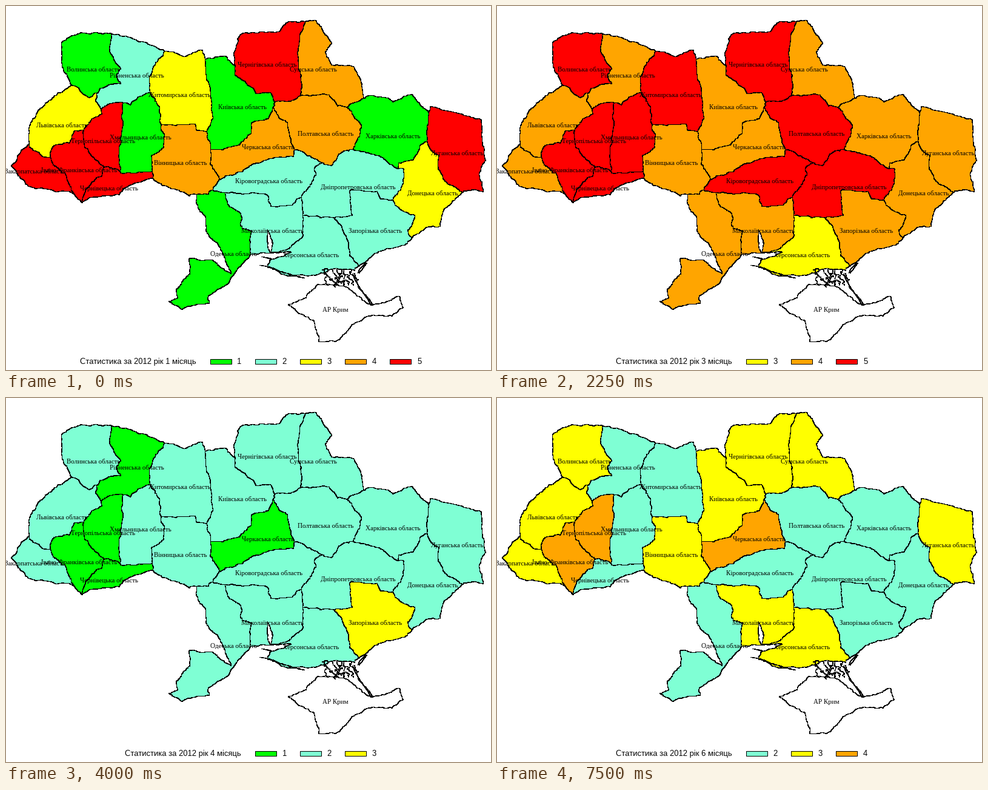
A matplotlib script for the animation above (8000 ms loop, 800 by 600 pixels).

```python
import numpy as np
import matplotlib
import matplotlib.pyplot as plt
from matplotlib.animation import FuncAnimation
from matplotlib.patches import Polygon, Rectangle

matplotlib.rcParams.update({"text.hinting": "native", "path.simplify": False})

DPI = 100
PX = 72 / DPI
INTERVAL = 250
FRAMES = 32
HOLD = 7          # frames per month
ELAPSED = 5       # frames of the first month already over
COLORS = {1: "#00ff00", 2: "#7fffd4", 3: "#ffff00", 4: "#ffa500", 5: "#ff0000"}

# Each month: the common level, then the regions that differ from it
MONTHS = [
    (5, {1: "vol kyi khm kha ode", 2: "riv kir dni myk khe zap",
         3: "zhy lvi don", 4: "sum vin chk pol"}),
    (2, {1: "chv", 3: "riv zhy chk dni khe", 4: "kyi kha zap", 5: "lvi kir ode"}),
    (4, {3: "khe", 5: "vol zhy chg ter khm ifr chv pol kir dni"}),
    (2, {1: "riv ter ifr chv chk", 3: "zap"}),
    (4, {3: "zhy chg ter zak luh dni don myk khe zap", 5: "chv"}),
    (2, {3: "vol kyi chg sum lvi zak vin luh myk khe", 4: "ter ifr chk"}),
]

# Points where borders meet
JUNCTIONS = dict(
    a=(108, 130), b=(150, 143), c=(175, 46), d=(261, 74), e=(237, 142), f=(193, 159),
    g=(156, 170), h=(128, 204), i=(72, 249), j=(37, 228), k=(113, 311), l=(125, 324),
    m=(162, 265), n=(189, 275), o=(241, 272), p=(242, 284), q=(255, 194), r=(328, 87),
    s=(331, 207), t=(337, 236), u=(353, 286), v=(341, 303), w=(314, 310), x=(378, 99),
    y=(443, 158), z=(440, 167), A=(475, 237), B=(521, 258), C=(487, 315), D=(361, 307),
    E=(494, 25), F=(486, 147), G=(590, 152), H=(563, 167), I=(572, 236), J=(646, 268),
    K=(694, 223), L=(697, 176), M=(752, 307), N=(638, 320), O=(670, 381), P=(541, 349),
    Q=(489, 345), R=(582, 428), S=(437, 407), T=(403, 409))

rng = np.random.default_rng(7)
fig = plt.figure(figsize=(800 / DPI, 600 / DPI), dpi=DPI, facecolor="white")
ax = fig.add_axes([0, 0, 1, 1])
ax.set_xlim(0, 800)
ax.set_ylim(600, 0)
ax.axis("off")

borders = []
patches = {}


def fractal(a, b, rough):
    """Points from a (left out) to b, by midpoint displacement."""
    length = np.hypot(*(b - a))
    if length < 3:
        return [b]
    middle = (a + b) / 2 + rng.normal(0, rough * np.sqrt(length), 2)
    return fractal(a, middle, rough) + fractal(middle, b, rough)


def jagged(points, rough=0.22):
    points = np.array(points, float)
    line = [points[0]]
    for a, b in zip(points, points[1:]):
        line += fractal(a, b, rough)
    return np.floor(line) + 0.5


def stroke(line):
    ax.plot(*line.T, color="black", linewidth=0.5 * PX, antialiased=False,
            snap=False, zorder=3)


def border(owners, ends, *bends):
    line = jagged([JUNCTIONS[ends[0]], *zip(bends[::2], bends[1::2]), JUNCTIONS[ends[1]]])
    borders.append((owners.split(), line))
    stroke(line)


def outline_of(key):
    """Chain every border of a region into one ring."""
    parts = [line for owners, line in borders if key in owners]
    ring = parts.pop(0)
    while parts:
        _, n, end = min((np.hypot(*(part[end] - ring[-1])), n, end)
                        for n, part in enumerate(parts) for end in (0, -1))
        part = parts.pop(n)
        ring = np.vstack([ring, part if end == 0 else part[::-1]])
    return ring


def label(x, y, text):
    ax.text(x, y + 3.5, text, family="Liberation Serif", fontsize=11 * PX,
            ha="center", va="baseline", zorder=5)


def region(key, name, x, y):
    patches[key] = ax.add_patch(Polygon(outline_of(key), linewidth=0, antialiased=False))
    label(x, y, name + " область")


# West
border("vol", "ac", 92, 95, 92, 59, 126, 44)
border("vol riv", "cb", 172, 78, 189, 104, 182, 115, 189, 128, 172, 129)
border("vol lvi", "ba", 137, 151, 119, 134)
border("riv", "cd", 208, 53, 246, 67)
border("riv zhy", "de", 249, 92, 236, 118)
border("riv khm", "ef", 224, 148, 205, 163)
border("riv ter", "fg", 175, 160)
border("riv lvi", "gb", 148, 153)
border("lvi", "aj", 92, 142, 55, 170, 38, 200)
border("lvi zak", "ji", 47, 238, 60, 248)
border("lvi ifr", "ih", 76, 232, 104, 226, 112, 206)
border("lvi ter", "hg", 140, 188, 158, 178)
border("zak", "jk", 27, 236, 8, 263, 36, 297, 62, 301)
border("zak ifr", "ik", 78, 262, 98, 278)
border("ifr", "kl")
border("ifr ter", "hm", 129, 232, 146, 252)
border("ifr chv", "ml", 158, 279, 140, 292, 130, 306)
border("ter khm", "fn", 190, 212)
border("ter chv", "mn", 182, 268)
border("khm chv", "no", 217, 274)
border("khm vin", "qo", 261, 214, 260, 233, 239, 246)
border("chv vin", "op")
border("chv", "pl", 213, 291, 187, 311, 143, 315)

# Centre
border("zhy", "dr", 278, 77, 293, 83, 324, 73)
border("zhy khm", "eq", 253, 166)
border("zhy vin", "qs", 311, 194, 315, 205)
border("zhy kyi", "rs", 331, 122, 341, 183)
border("vin", "pw", 258, 296, 280, 302, 302, 313)
border("vin kyi", "st")
border("vin chk", "tu", 337, 258)
border("vin kir", "uv")
border("vin ode", "vw", 333, 310)
border("kyi", "rx", 363, 83)
border("kyi chg", "xy", 377, 113, 405, 134, 412, 144, 437, 143)
border("kyi pol", "yz")
border("kyi chk", "zt", 432, 186, 405, 192, 404, 210, 385, 228, 357, 237)
border("chk pol", "zA", 464, 192)
border("chk kir", "Au", 474, 248, 450, 249, 405, 261, 378, 277)
border("kir pol", "AB", 495, 245)
border("kir dni", "BC", 508, 267, 511, 278, 501, 297)
border("kir myk", "CD", 472, 328, 437, 330, 428, 310, 380, 309)
border("kir ode", "Dv")

# East
border("chg", "xE", 376, 76, 387, 46, 450, 42, 463, 27)
border("chg sum", "EF", 485, 45, 481, 80, 487, 115)
border("chg pol", "Fy", 470, 157)
border("sum", "EG", 510, 23, 537, 61, 528, 74, 537, 97, 574, 100, 583, 118)
border("sum pol", "HF", 547, 165, 533, 146)
border("sum kha", "GH")
border("kha", "GL", 604, 147, 638, 158, 669, 145, 679, 158)
border("kha pol", "HI", 586, 197, 583, 215)
border("kha dni", "IJ", 617, 248)
border("kha don", "JK", 647, 258, 671, 254, 682, 230)
border("kha luh", "LK", 694, 200)
border("luh", "LM", 700, 165, 752, 178, 783, 187, 785, 218, 791, 255, 780, 276, 787, 306)
border("don luh", "KM", 701, 238, 714, 246, 714, 270, 728, 293)
border("don", "MO", 722, 335, 716, 363, 692, 365)
border("don dni", "JN", 656, 268, 655, 292)
border("don zap", "NO", 650, 335, 674, 345, 663, 374)

# South
border("dni pol", "BI", 537, 263, 553, 241)
border("dni zap", "PN", 571, 345, 566, 305, 612, 305, 618, 318)
border("dni khe", "PQ")
border("dni myk", "QC")
border("zap", "OR", 662, 391, 620, 403)
border("khe zap", "PR", 553, 362, 565, 391, 566, 411)
border("khe myk", "QS", 490, 378, 470, 397)
border("khe", "SR", 470, 405, 436, 418, 431, 430, 455, 442, 510, 444, 540, 433, 575, 436)
border("myk", "ST", 439, 386, 431, 368, 436, 407)
border("myk ode", "DT", 368, 330, 387, 342, 389, 366, 405, 371)
border("ode", "wT", 314, 325, 329, 348, 335, 380, 348, 390, 371, 441, 340, 418, 302, 416,
       303, 440, 280, 468, 283, 481, 268, 487, 290, 500, 335, 490, 333, 478, 360, 462,
       381, 435)

region("vol", "Волинська", 144.5, 104)
region("riv", "Рівненська", 216, 115)
region("zhy", "Житомирська", 286, 146)
region("kyi", "Київська", 390.5, 166)
region("chg", "Чернігівська", 431, 97)
region("sum", "Сумська", 507, 104)
region("lvi", "Львівська", 92.5, 196)
region("ter", "Тернопільська", 160, 223)
region("khm", "Хмельницька", 222, 216)
region("zak", "Закарпатська", 48, 273)
region("ifr", "Івано-Франківська", 121, 270)
region("chv", "Чернівецька", 170.5, 300)
region("vin", "Вінницька", 287.5, 258)
region("chk", "Черкаська", 432, 232)
region("pol", "Полтавська", 527, 210)
region("kha", "Харківська", 638, 214)
region("luh", "Луганська", 744, 242)
region("kir", "Кіровоградська", 434, 289)
region("dni", "Дніпропетровська", 581, 298)
region("don", "Донецька", 704, 308)
region("myk", "Миколаївська", 440, 370)
region("ode", "Одеська", 375.5, 408)
region("khe", "Херсонська", 503, 410)
region("zap", "Запорізька", 609.5, 371)

# Peninsula, spits and the ragged salt lagoons
stroke(jagged([(465, 492), (495, 480), (513, 459), (564, 464), (579, 478), (603, 493),
               (648, 478), (655, 497), (636, 511), (600, 511), (575, 523), (543, 553),
               (516, 553), (507, 518), (465, 492)]))
label(543, 500, "АР Крим")
for spit in ([(418, 427), (450, 437), (490, 448)], [(572, 440), (580, 462), (603, 492)],
             [(593, 423), (580, 440)], [(421, 413), (437, 417)]):
    for shift in (0, 2):
        stroke(jagged(np.add(spit, (shift, 0)), 0.1))
for x in range(522, 572, 8):
    stroke(jagged([(x, 434), (x + 4, 448), (x + 10, 460)], 0.75))


def legend_text(x):
    return ax.text(x, 590, "", family="Liberation Sans", fontsize=13 * PX,
                   ha="center", va="baseline")


title = legend_text(0)
swatches = []
for slot in range(5):
    x = 336.5 + 74.2 * slot
    box = ax.add_patch(Rectangle((x, 581.5), 35, 8, edgecolor="black", linewidth=PX))
    swatches.append((box, legend_text(x + 48.5)))


def draw(frame):
    month = (frame + ELAPSED) // HOLD
    common, others = MONTHS[month]
    levels = dict.fromkeys(patches, common)
    for level, keys in others.items():
        levels.update(dict.fromkeys(keys.split(), level))
    for key, patch in patches.items():
        patch.set_facecolor(COLORS[levels[key]])

    used = sorted(set(levels.values()))
    first = (5 - len(used)) // 2
    title.set_text(f"Статистика за 2012 рік {month + 1} місяць")
    title.set_x(217.5 + 74 * first)
    for slot, (box, number) in enumerate(swatches):
        shown = first <= slot < first + len(used)
        box.set_visible(shown)
        number.set_visible(shown)
        if shown:
            box.set_facecolor(COLORS[used[slot - first]])
            number.set_text(str(used[slot - first]))
    return []


anim = FuncAnimation(fig, draw, frames=FRAMES, interval=INTERVAL, repeat=True,
                     repeat_delay=0, blit=False)
plt.show()
```
